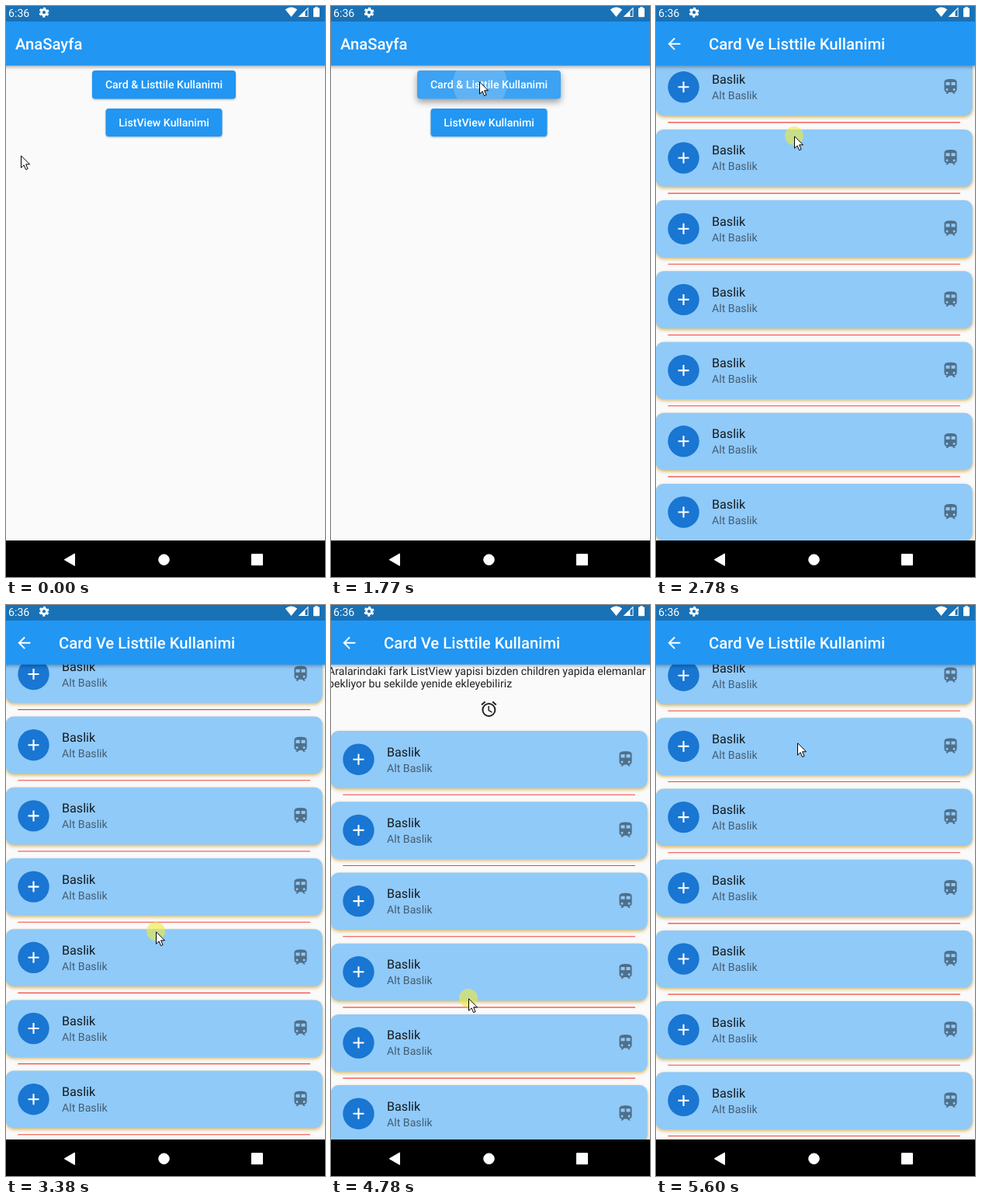
Animation of 411x735 px, one loop 6200 ms. Source, as an HTML page:

```html
<!DOCTYPE html>
<html lang="tr">
<head>
<meta charset="utf-8">
<title>AnaSayfa</title>
<style>
  html, body { margin: 0; width: 100%; height: 100%; overflow: hidden; background: #fafafa; }
  svg { display: block; font: 14.16px Roboto, sans-serif; text-rendering: geometricPrecision; }
  .title { font-size: 20.3px; font-weight: 500; fill: #fff; }
  .bar { fill: #2196f3; filter: drop-shadow(0 2px 2px rgba(0,0,0,.3)); }
  .button { fill: #2196f3; filter: drop-shadow(0 1.5px 1.2px rgba(0,0,0,.3)); }
  .button.pressed { fill: #3ba2f4; filter: drop-shadow(0 4px 4px rgba(0,0,0,.38)); }
  .label { font-weight: 500; fill: #fff; text-anchor: middle; }
  .card { fill: #90caf9; filter: drop-shadow(0 2.5px 2.2px rgba(196,152,40,.7)); }
  .body { fill: rgba(0,0,0,.87); }
  .head { font-size: 16.14px; fill: rgba(0,0,0,.87); }
  .sub { fill: rgba(0,0,0,.54); }
</style>
</head>
<body>
<svg width="411" height="735" viewBox="0 0 411 735">
  <defs>
    <clipPath id="buttonClip"><rect x="111" y="83" width="185" height="36.5" rx="4"/></clipPath>
    <g id="train">
      <path d="M12 2c-4 0-8 .5-8 4v9.5C4 17.43 5.57 19 7.5 19L6 20.5v.5h2.23l2-2H14l2 2h2v-.5L16.5 19c1.93 0 3.5-1.57 3.5-3.5V6c0-3.5-3.58-4-8-4zM7.5 17a1.5 1.5 0 1 1 0-3 1.5 1.5 0 0 1 0 3zM11 10H6V6h5zM13 10V6h5v4zM16.5 17a1.5 1.5 0 1 1 0-3 1.5 1.5 0 0 1 0 3z"/>
    </g>
  </defs>

  <g id="home">
    <rect width="411" height="735" fill="#fafafa"/>
    <rect class="bar" x="-9" width="429" height="76.7"/>
    <text class="title" x="12" y="56.3">AnaSayfa</text>
    <rect id="first" class="button" x="111" y="83" width="185" height="36.5" rx="4"/>
    <circle id="ripple" cx="192" cy="100" r="35" fill="#fff" fill-opacity=".18" clip-path="url(#buttonClip)"/>
    <text class="label" x="203.5" y="106.3">Card &amp; Listtile Kullanimi</text>
    <rect class="button" x="128.5" y="132" width="150" height="36" rx="4"/>
    <text class="label" x="203.5" y="155">ListView Kullanimi</text>
  </g>

  <g id="page">
    <rect width="411" height="735" fill="#fafafa"/>
    <g id="list">
      <text class="body" x="-4" y="90">Aralarindaki fark ListView yapisi bizden children yapida elemanlar</text>
      <text class="body" x="-4" y="106.3">bekliyor bu sekilde yenide ekleyebiliriz</text>
      <g transform="translate(191.4 122)" fill="none" stroke="#222" stroke-width="2">
        <circle cx="12" cy="13" r="8"/>
        <path d="M2.6 6.5L7.2 2.6M21.4 6.5L16.8 2.6"/>
        <path d="M11.75 8v5.6l4.4 2.6" stroke-width="1.5"/>
      </g>
    </g>
    <path id="glow" fill="#2196f3"/>
    <rect class="bar" x="-9" width="429" height="76.7"/>
    <path transform="translate(11.4 36.8)" fill="#fff" d="M20 11H7.83l5.59-5.59L12 4l-8 8 8 8 1.41-1.41L7.83 13H20z"/>
    <text class="title" x="68" y="56.3">Card Ve Listtile Kullanimi</text>
  </g>

  <rect width="411" height="20" fill="#000" fill-opacity=".25"/>
  <g fill="#fff">
    <text x="3" y="14">6:36</text>
    <g fill="none" stroke="#fff">
      <circle cx="49" cy="8.2" r="3.5" stroke-width="2.8"/>
      <circle cx="49" cy="8.2" r="5.5" stroke-width="2" stroke-dasharray="3 2.76" stroke-dashoffset="-1.38"/>
    </g>
    <path d="M367.5 14L359.8 4.6Q367.5-1.4 375.2 4.6z"/>
    <path d="M376.5 14L389.5 1.5V14zM385.5 7V13H388.5V4z" fill-rule="evenodd"/>
    <path d="M398.2 2.5V1.2h3.6v1.3h1.4q.8 0 .8.8v10.2q0 .8-.8.8h-6.4q-.8 0-.8-.8V3.3q0-.8.8-.8z"/>
  </g>

  <rect y="688" width="411" height="47"/>
  <g fill="#fff" stroke="#fff" stroke-linejoin="round">
    <path d="M75.2 712.7L88.5 705V720.4z"/>
    <circle cx="203.5" cy="712.7" r="6.8"/>
    <rect x="316.5" y="705.7" width="14" height="14"/>
  </g>

  <g id="cursor">
    <circle id="press" r="12" fill="#f0eb3c" fill-opacity=".6"/>
    <path d="M.5.8V16.2L4.1 12.8 6.6 18.6 9.1 17.5 6.6 11.8H11.5z" fill="#fff" stroke="#000"/>
  </g>
</svg>
<script>
const LOOP = 6200, STEP = 200, LEAD = 30;
const TOP = 162.1, PITCH = 91.2, ROWS = 10, MAX_SCROLL = 381.6;
const $ = id => document.getElementById(id);
const show = (id, on) => $(id).setAttribute('visibility', on ? 'inherit' : 'hidden');
const move = (id, x, y) => $(id).setAttribute('transform', `translate(${x} ${y})`);
const clamp = p => Math.min(1, Math.max(0, p));
const linear = p => p;
const easeOut = p => 1 - (1 - p) ** 2.4;

const row = i => `<g transform="translate(0 ${TOP + i * PITCH})">
  <rect class="card" x="-.3" width="408" height="73.6" rx="10"/>
  <circle cx="35.5" cy="36.6" r="20.2" fill="#1976d2"/>
  <path d="M28.5 36.6h14M35.5 29.6v14" stroke="#fff" stroke-width="2.1"/>
  <text class="head" x="72" y="32.6">Baslik</text>
  <text class="sub" x="72" y="52.6">Alt Baslik</text>
  <use href="#train" transform="translate(367.4 24.2) scale(1.009)" fill="#000" fill-opacity=".45"/>
  <path d="M15.3 82.2H392" stroke="#f44336" stroke-width="1.1"/>
</g>`;
$('list').insertAdjacentHTML('beforeend', Array.from({ length: ROWS }, (_, i) => row(i)).join(''));

// Each stop: time, position, easing on the way there
const pointerPath = [
  { at: 0, pos: [19, 192] },
  { at: 540, pos: [191, 97], ease: easeOut },
  { at: 1970, pos: [191, 97] },
  { at: 2770, pos: [178, 167] },
  { at: 3370, pos: [193, 420] },
  { at: 3770, pos: [191, 434] },
  { at: 4170, pos: [150, 306] },
  { at: 4570, pos: [177, 506] },
  { at: 4770, pos: [177, 506] },
  { at: 5170, pos: [182, 177] },
];
const scrollPath = [
  { at: 2570, pos: [0] },
  { at: 2770, pos: [368] },
  { at: 3370, pos: [109.7] },
  { at: 3970, pos: [0], ease: easeOut },
  { at: 4770, pos: [0] },
  { at: 5170, pos: [MAX_SCROLL] },
];

function along(path, t) {
  const next = path.findIndex(stop => stop.at > t);
  if (next < 1) return path.at(next).pos;
  const from = path[next - 1], { at, pos, ease = linear } = path[next];
  const p = ease((t - from.at) / (at - from.at));
  return from.pos.map((v, i) => v + (pos[i] - v) * p);
}

function draw(t) {
  move('cursor', ...along(pointerPath, t));
  show('press', (t >= 2770 && t < 3570) || (t >= 4770 && t < 5170));

  const touched = t >= 1770;
  $('first').classList.toggle('pressed', touched);
  show('ripple', touched);

  const entry = clamp((t - 1770) / 400);
  $('page').setAttribute('opacity', entry ** 1.5);
  move('page', 0, 184 * (1 - easeOut(entry)));
  move('list', 0, -along(scrollPath, t)[0]);

  // Overscroll glow at the end of the list
  const glow = t < 5170 ? 0 : (1 - clamp((t - 5170) / 400)) ** 2;
  $('glow').setAttribute('d', `M-4 688Q203.5 ${688 - 132 * glow} 411 688z`);
  $('glow').setAttribute('fill-opacity', .28 * glow);
}

// The screen refreshes in steps, five times a second
function tick() {
  const t = performance.now() % LOOP;
  draw(Math.floor((t + LEAD) / STEP) * STEP - LEAD);
  requestAnimationFrame(tick);
}
tick();
</script>
</body>
</html>
```
